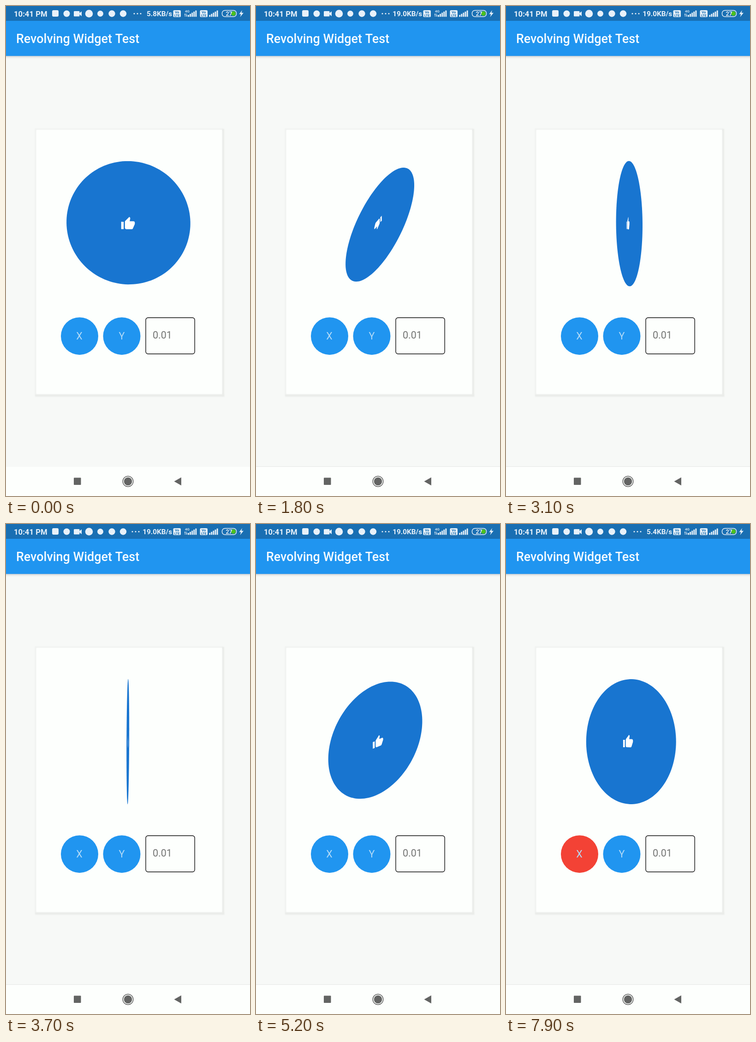
Animation, 529 px wide and 1058 px high, one loop 8000 ms. Source, as an HTML page with a canvas:

```html
<!DOCTYPE html>
<html lang="en">
<head>
<meta charset="utf-8">
<title>Revolving Widget Test</title>
<style>
  html, body { margin: 0; width: 100%; height: 100%; overflow: hidden; background: #f7f9f7; }
  canvas { display: block; width: 529px; height: 1058px; }
</style>
</head>
<body>
<canvas id="stage" width="529" height="1058"></canvas>
<script>
const ctx = document.getElementById('stage').getContext('2d');
const LOOP = 8000;
const BLUE = [32, 149, 240], RED = [243, 66, 53];
const CENTER = { x: 264.5, y: 470 };
const DP = 1.346;
const RADIUS = 100 * DP;
const PERSPECTIVE = 0.001 / DP;

// Drag path: time, tilt about the x axis, turn about the y axis.
const PATH = [
  [300, 0.15, 0.07], [800, 0.7, 0.6], [1100, 0.7, 0.6], [1800, 2.288, 2.153],
  [3100, 0.03, 1.358], [4300, 0.417, 1.827], [5200, 0.484, -0.717], [6400, 0, 0]
];
const PAUSES = [[800, 1200], [6400, 6700], [7000, 7300]];

// Icon outline on a 24 unit grid.
const CUFF = [[1, 9], [5, 9], [5, 21], [1, 21]];
const HAND = [
  [7, 9], [7.15, 8.2], [7.6, 7.6], [14.17, 1], [15.23, 2.05], [15.6, 2.6], [15.64, 3.43],
  [14.69, 8], [21, 8], [22.4, 8.6], [23, 10], [23, 12], [22.86, 12.73], [19.84, 19.78],
  [19.1, 20.7], [18, 21], [9, 21], [7.6, 20.4], [7, 19]
];
const DISC = Array.from({ length: 144 }, (_, i) => {
  const angle = i * Math.PI / 72;
  return [RADIUS * Math.cos(angle), RADIUS * Math.sin(angle)];
});

const clamp01 = v => Math.min(1, Math.max(0, v));
const rgb = c => `rgb(${c.map(Math.round).join()})`;
const mix = (a, b, k) => a.map((v, i) => v + (b[i] - v) * k);

// Monotone cubic through one column of PATH.
function follow(t, col) {
  const last = PATH.length - 1;
  if (t <= PATH[0][0]) return PATH[0][col];
  if (t >= PATH[last][0]) return PATH[last][col];
  const i = PATH.findIndex(p => p[0] > t) - 1;
  const slope = j => j < 0 || j >= last ? 0
    : (PATH[j + 1][col] - PATH[j][col]) / (PATH[j + 1][0] - PATH[j][0]);
  const tangent = j => {
    const p = slope(j - 1), q = slope(j);
    return p * q <= 0 ? 0 : 2 * p * q / (p + q);
  };
  const span = PATH[i + 1][0] - PATH[i][0];
  const u = (t - PATH[i][0]) / span, v = 1 - u;
  return PATH[i][col] * (1 + 2 * u) * v * v + PATH[i + 1][col] * u * u * (3 - 2 * u)
    + span * u * v * (tangent(i) * v - tangent(i + 1) * u);
}

function pose(t) {
  if (t >= 6700) return { tilt: 0, turn: 0.11 + 0.547 * (t - 6700) / 1000 };
  return { tilt: follow(t, 1), turn: follow(t, 2) };
}

function project([x, y], { tilt, turn }) {
  const depth = -x * Math.sin(turn);
  const py = y * Math.cos(tilt) - depth * Math.sin(tilt);
  const pz = y * Math.sin(tilt) + depth * Math.cos(tilt);
  const w = 1 + PERSPECTIVE * pz;
  return [CENTER.x + x * Math.cos(turn) / w, CENTER.y + py / w];
}

function rect(x, y, w, h, color) {
  ctx.fillStyle = color;
  ctx.fillRect(x, y, w, h);
}

function circle(x, y, r, color) {
  ctx.beginPath();
  ctx.arc(x, y, r, 0, 7);
  ctx.fillStyle = color;
  ctx.fill();
}

function polygon(points, color) {
  ctx.beginPath();
  points.forEach(p => ctx.lineTo(p[0], p[1]));
  ctx.closePath();
  ctx.fillStyle = color;
  ctx.fill();
}

function roundBox(x, y, w, h, r, color) {
  ctx.beginPath();
  ctx.roundRect(x, y, w, h, r);
  ctx.fillStyle = color;
  ctx.fill();
}

function roundFrame(x, y, w, h, r, color, line) {
  ctx.beginPath();
  ctx.roundRect(x, y, w, h, r);
  ctx.strokeStyle = color;
  ctx.lineWidth = line;
  ctx.stroke();
}

function softRect(x, y, w, h, color, blur) {
  ctx.save();
  ctx.shadowBlur = blur;
  ctx.shadowColor = color;
  rect(x, y, w, h, color);
  ctx.restore();
}

function text(str, x, y, size, color, weight = 400, align = 'left') {
  ctx.font = `${weight} ${size}px Roboto, sans-serif`;
  ctx.textAlign = align;
  ctx.fillStyle = color;
  ctx.fillText(str, x, y);
}

function signal(x) {
  for (let i = 0; i < 5; i++) {
    const h = 4 + i * 2.4;
    rect(x + i * 4.1, 23.3 - h, 2.9, h, '#e6f0f8');
  }
}

function volte(x) {
  roundBox(x, 9, 16.5, 15, 2.5, '#e6f0f8');
  text('Vo', x + 8.2, 16, 7.5, '#196fb3', 700, 'center');
  text('LTE', x + 8.2, 23, 7, '#196fb3', 700, 'center');
}

function battery() {
  circle(493, 16.3, 5, '#4cc01f');
  roundFrame(468.5, 9.5, 31, 13.5, 6, '#e6f0f8', 1.5);
  text('27', 483.5, 20.8, 12.5, '#fff', 500, 'center');
  polygon([[512, 9], [505.5, 17.5], [509.5, 17.5], [507.5, 24], [515, 14.8], [510.5, 14.8]], '#e6f0f8');
}

function statusBar(t) {
  const ink = '#e8f1f9';
  rect(0, 0, 529, 32, '#196fb3');
  text('10:41 PM', 17, 22.5, 16.7, ink, 700);
  roundBox(100, 9, 14, 14, 3, ink);
  circle(131.5, 16.5, 7, ink);
  roundBox(147, 11, 12.5, 11.5, 1.5, ink);
  polygon([[159, 15.5], [164, 11.5], [164, 22], [159, 18]], ink);
  circle(180, 16.5, 8.3, ink);
  circle(204.5, 16.5, 6.5, ink);
  circle(229.5, 16.5, 7.2, ink);
  // The rightmost notification is pushed along when a new one arrives.
  circle(254, 16.5, 7.2, ink);

  const fast = t >= 1700 && t < 5700;
  const speed = fast ? '19.0KB/s' : t < 1700 ? '5.8KB/s' : '5.4KB/s';
  for (let i = -1; i <= 1; i++) circle((fast ? 281 : 285) + i * 7, 16.5, 1.5, ink);
  text(speed, 360, 22, 15.3, ink, 700, 'right');

  volte(362.5);
  text('4G', 388, 14, 8, ink, 500);
  polygon([[386.5, 18.5], [388.2, 16], [390, 18.5]], ink);
  rect(387.7, 18, 1, 5, ink);
  polygon([[389.8, 20.8], [393.2, 20.8], [391.5, 23.3]], ink);
  rect(391, 16.5, 1, 5, ink);
  signal(394);
  volte(420.5);
  signal(440.3);
  battery();
}

function appBar() {
  const g = ctx.createLinearGradient(0, 107.7, 0, 114);
  g.addColorStop(0, '#c6cacc');
  g.addColorStop(0.35, '#e4e6e6');
  g.addColorStop(1, '#f7f9f7');
  rect(0, 107, 529, 7, g);
  rect(0, 32, 529, 75.8, '#2095f0');
  text('Revolving Widget Test', 22, 80, 20 * DP, '#f6fbff', 500);
}

function card() {
  softRect(62.5, 264.5, 409, 578, '#f1f3f1', 3);
  softRect(469, 266, 3.5, 577, '#ebedea', 2);
  softRect(64, 839, 408.5, 4, '#ebedea', 2);
  softRect(66, 267.5, 402, 570, '#fdfffd', 3);
}

function widget(t) {
  const p = pose(t);
  const icon = points => points.map(([x, y]) => project([(x - 12) * DP, (y - 12) * DP], p));
  polygon(DISC.map(q => project(q, p)), '#1875d0');
  polygon(icon(CUFF), '#fff');
  polygon(icon(HAND), '#fff');
}

function controls(t) {
  circle(159.5, 712.7, 40.5, rgb(mix(BLUE, RED, clamp01((t - 6650) / 200))));
  circle(251, 712.7, 40.5, rgb(BLUE));
  text('X', 159, 720, 16 * DP, '#b4dbf7', 400, 'center');
  text('Y', 251, 720, 16 * DP, '#b4dbf7', 400, 'center');
  roundFrame(303, 673, 106.2, 78.2, 5, '#111', 1.4);
  text('0.01', 318, 718, 16 * DP, '#737473');
}

function navBar(t) {
  const ink = '#636463';
  rect(0, 995, 529, 63, '#fdfffd');
  if (t >= 400) rect(0, 994, 529, 1, '#e6e7e6');
  roundBox(147, 1018.5, 15.5, 15.5, 1, ink);
  circle(264.5, 1026.5, 8.8, ink);
  ctx.beginPath();
  ctx.arc(264.5, 1026.5, 11.3, 0, 7);
  ctx.strokeStyle = ink;
  ctx.lineWidth = 1.5;
  ctx.stroke();
  polygon([[364.5, 1026.5], [380, 1017.8], [380, 1035.2]], ink);
}

function draw(now) {
  let t = Math.floor(now % LOOP / 100) * 100;
  const pause = PAUSES.find(([from, to]) => t >= from && t < to);
  if (pause) t = pause[0];
  rect(0, 0, 529, 1058, '#f7f9f7');
  appBar();
  statusBar(t);
  card();
  widget(t);
  controls(t);
  navBar(t);
}

const start = performance.now();
function tick() {
  draw(performance.now() - start);
  requestAnimationFrame(tick);
}
tick();
</script>
</body>
</html>
```
